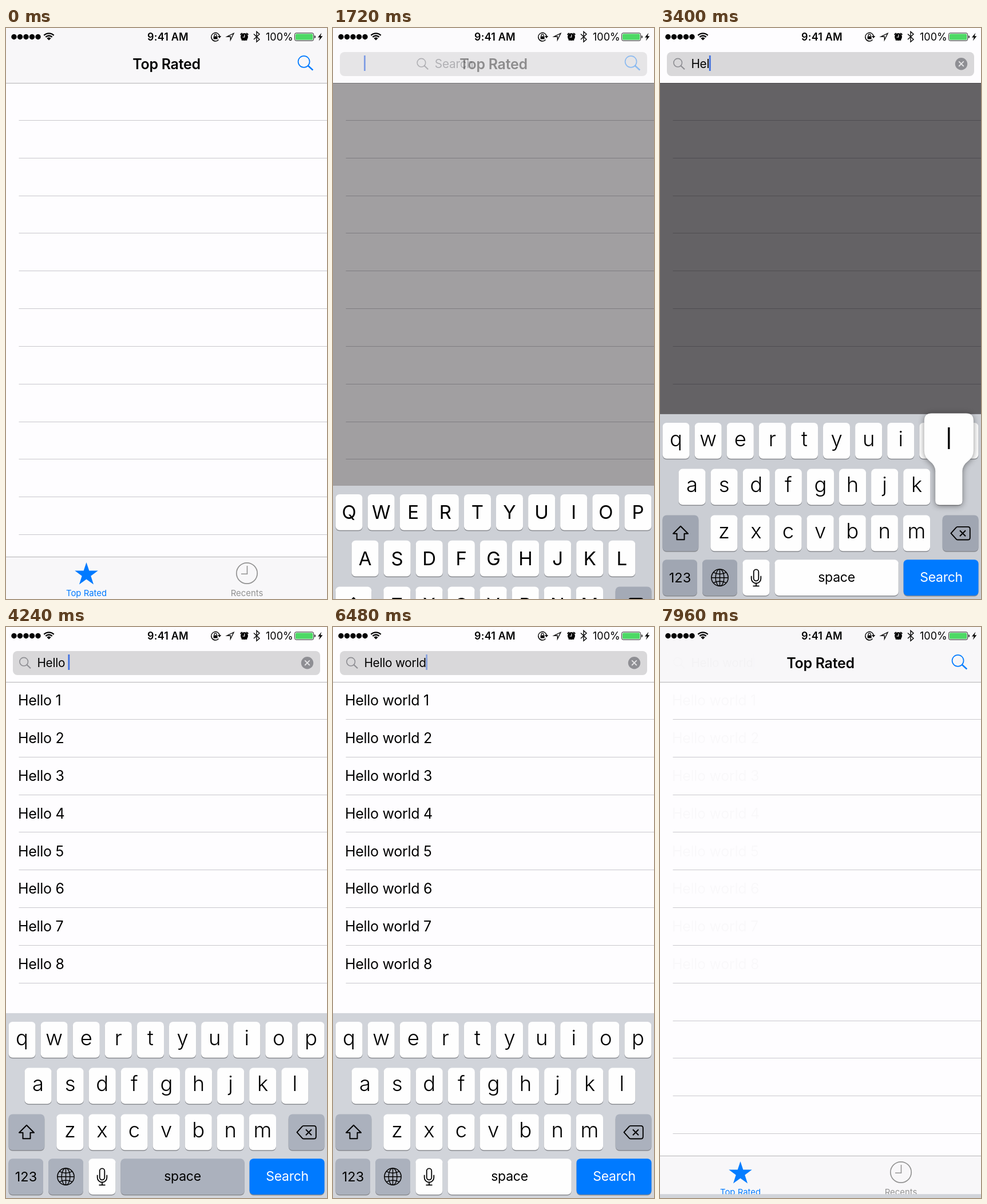
These frames come from a looping animation (561x998 px, 8000 ms). An HTML page with a canvas:

```html
<!DOCTYPE html>
<html lang="en">
<head>
<meta charset="utf-8">
<title>Search</title>
<style>
html, body { margin: 0; width: 100%; height: 100%; overflow: hidden; background: #fefdff; }
canvas { display: block; width: 561px; height: 998px; }
</style>
</head>
<body>
<canvas id="stage" width="561" height="998"></canvas>
<script>
const W = 561, H = 998, LOOP = 8000;
const ctx = document.getElementById('stage').getContext('2d');
const FONT = 'Inter, Roboto, "Liberation Sans", sans-serif';
const BLUE = '#007aff', WHITE = '#fefdff', NAV_H = 96, ROW = 65.82, KB_H = 323.1;

// Timeline in ms
const OPEN = 1602, CLOSE = 7640, SELECT = 7520, DEBOUNCE = 240;
const QUERY = 'Hello world';
const TYPED = [2840, 3180, 3340, 3480, 3620, 4200, 4320, 4420, 4520, 4620, 4720];
const RESULTS = [{ at: TYPED[4] + DEBOUNCE, text: 'Hello' }, { at: TYPED[10] + DEBOUNCE, text: QUERY }];

const clamp = v => Math.max(0, Math.min(1, v));
const lerp = (a, b, p) => a + (b - a) * p;
const mix = (a, b, p) => `rgb(${a.map((v, i) => Math.round(lerp(v, b[i], p)))})`;
const ease = p => 0.5 - 0.5 * Math.cos(Math.PI * clamp(p));
// Remaining distance of a critically damped spring
const spring = (ms, w) => ms <= 0 ? 1 : (1 + w * ms / 1000) * Math.exp(-w * ms / 1000);

function text(s, x, y, size, color, { weight = 400, align = 'left', track = -0.012 } = {}) {
  ctx.font = `${weight} ${size}px ${FONT}`;
  ctx.letterSpacing = `${track * size}px`;
  ctx.textAlign = align;
  ctx.fillStyle = color;
  ctx.fillText(s, x, y);
}

function rect(x, y, w, h, color) {
  ctx.fillStyle = color;
  ctx.fillRect(x, y, w, h);
}

function round(x, y, w, h, r, color) {
  ctx.beginPath();
  ctx.roundRect(x, y, w, h, r);
  ctx.fillStyle = color;
  ctx.fill();
}

function disc(x, y, r, color) {
  ctx.beginPath();
  ctx.arc(x, y, r, 0, 7);
  ctx.fillStyle = color;
  ctx.fill();
}

function stroke(path, color, width) {
  ctx.strokeStyle = color;
  ctx.lineWidth = width;
  ctx.stroke(new Path2D(path));
}

function fill(path, color) {
  ctx.fillStyle = color;
  ctx.fill(new Path2D(path));
}

function ring(x, y, r, color, width) {
  ctx.beginPath();
  ctx.arc(x, y, r, 0, 7);
  ctx.strokeStyle = color;
  ctx.lineWidth = width;
  ctx.stroke();
}

function layer(alpha, draw) {
  if (alpha <= 0.004) return;
  ctx.save();
  ctx.globalAlpha *= alpha;
  draw();
  ctx.restore();
}

function statusBar() {
  for (let i = 0; i < 5; i++) disc(14 + i * 10.5, 15.5, 4.7, '#000');
  for (const r of [12.2, 8]) {
    ctx.beginPath();
    ctx.arc(75, 21.5, r, -Math.PI * 0.75, -Math.PI * 0.25);
    ctx.strokeStyle = '#000';
    ctx.lineWidth = 2.3;
    ctx.stroke();
  }
  fill('M75 21.5 L71.4 17.9 A5 5 0 0 1 78.6 17.9 Z', '#000');
  text('9:41 AM', 283, 21.5, 18, '#000', { weight: 600, align: 'center', track: 0.01 });

  stroke('M371.5 20.5 A7.3 7.3 0 1 1 373.3 15', '#000', 1.4);
  fill('M370 14 h6.2 l-3.1 4 Z M362.6 14.5 h7 v5 h-7 Z', '#000');
  stroke('M364 14.5 v-1.6 a2.1 2.1 0 0 1 4.2 0 v1.6', '#000', 1.3);
  stroke('M398 9.3 L386.2 15 H392.3 V21 Z', '#000', 1.3);
  disc(416.5, 15.6, 6.5, '#000');
  stroke('M409.6 11.8 l3.2 -2.9 M423.4 11.8 l-3.2 -2.9 M412 21.5 l1.5 -1.5 M421 21.5 l-1.5 -1.5', '#000', 1.9);
  stroke('M416.8 11.5 V16 H413.5', WHITE, 1.2);
  stroke('M433 10.6 L443 20 L438 24.2 V6.4 L443 10.8 L433 20', '#000', 1.4);
  text('100%', 454, 21.7, 18, '#000', { track: 0 });
  ctx.beginPath();
  ctx.roundRect(504.6, 8.8, 33, 13.4, 2.5);
  ctx.strokeStyle = '#222';
  ctx.lineWidth = 1;
  ctx.stroke();
  round(506, 10.2, 30.2, 10.6, 1.5, '#4cd964');
  fill('M539 13 q2 .4 2 2.5 q0 2.1 -2 2.5 Z', '#222');
  fill('M551.5 8.5 L545 16.4 H548.7 L546.8 22.5 L553.4 14.2 H549.6 Z', '#000');
}

function separators() {
  for (let i = 0; i < 12; i++) rect(22.5, Math.round(161 + ROW * i), W, 1, '#c8c7cc');
}

function tabBar() {
  rect(0, 924, W, H - 924, '#f8f7f9');
  rect(0, 924, W, 1, '#b2b2b4');
  ctx.beginPath();
  for (let i = 0; i < 10; i++) {
    const r = i % 2 ? 8.2 : 21.3, a = Math.PI * (i / 5 - 0.5);
    ctx.lineTo(140.5 + r * Math.cos(a), 955.2 + r * Math.sin(a));
  }
  ctx.fillStyle = BLUE;
  ctx.fill();
  text('Top Rated', 140.5, 993, 14.9, BLUE, { align: 'center', track: 0 });
  ring(421, 953, 18.2, '#929292', 1.7);
  stroke('M421.5 940 V954.2 H411', '#929292', 1.6);
  text('Recents', 421, 993, 14.9, '#929292', { align: 'center', track: 0 });
}

function resultRows(t) {
  const shown = RESULTS.filter(r => t >= r.at).pop();
  if (!shown) return;
  rect(0, NAV_H + 1, W, H, WHITE);
  separators();
  if (t >= SELECT) rect(0, NAV_H + 1, W, 65, '#d9d8d9');
  for (let i = 0; i < 8; i++) text(`${shown.text} ${i + 1}`, 21, 137.3 + ROW * i, 25, '#000');
}

function caretAlpha(t) {
  const since = t - [OPEN, ...TYPED].filter(k => t >= k).pop() - 630;
  if (since < 0) return 1;
  const v = since % 1020;
  return v < 510 ? clamp(1 - v / 230) : clamp((v - 510) / 230);
}

function searchField(t, query) {
  round(12, 42, 537, 42, 8, '#d9d8da');
  const slide = 208 * (1 - ease((t - OPEN) / 270));
  ctx.save();
  ctx.translate(slide, 0);
  ring(31.2, 60.7, 7.3, '#8e8e93', 1.6);
  stroke('M36.4 66 L43 72.3', '#8e8e93', 2);
  if (!query) text('Search', 54.6, 70, 20.8, '#8e8e93');
  ctx.restore();
  let caretX = 54;
  if (query) {
    text(query, 54.4, 70, 20.8, '#000');
    caretX += ctx.measureText(query).width;
    disc(526.5, 62.7, 10.7, '#8e8e93');
    stroke('M522.2 58.4 l8.6 8.6 m0 -8.6 l-8.6 8.6', '#e4e3e5', 1.8);
  }
  layer(caretAlpha(t), () => rect(caretX, 48, 2.8, 27, '#3f70e2'));
}

function navBar(t, shown, query) {
  rect(0, 0, W, NAV_H, mix([248, 247, 249], [254, 253, 255], shown));
  layer(shown, () => searchField(t, query));
  layer(1 - shown, () => {
    text('Top Rated', 280.5, 71.8, 25, '#000', { weight: 600, align: 'center' });
    const pressed = t >= 1480 && t < CLOSE ? lerp(0.25, 1, clamp((t - 1540) / 100)) : 1;
    layer(pressed, () => {
      ring(520.6, 58.8, 10, BLUE, 1.7);
      stroke('M528 66 L536.3 73.6', BLUE, 2.6);
    });
  });
}

const ROWS = [['qwertyuiop', 4.5], ['asdfghjkl', 32.5], ['zxcvbnm', 88.3]];
const PITCH = 56.1, KEY_W = 47.1, KEY_H = 62.8;
const rowTop = i => [15, 95.7, 176.5, 254.3][i];

function key(x, y, w, color) {
  round(x, y + 1.5, w, KEY_H, 7, '#898b90');
  round(x, y, w, KEY_H, 7, color);
}

function popup(char, top) {
  const r = ROWS.findIndex(([s]) => s.includes(char.toLowerCase()));
  const x = ROWS[r][1] + PITCH * ROWS[r][0].indexOf(char.toLowerCase());
  const y = top + rowTop(r), e = x + KEY_W, o = 19.5;
  ctx.save();
  ctx.shadowColor = 'rgba(0,0,0,.45)';
  ctx.shadowBlur = 11;
  ctx.shadowOffsetY = 1.5;
  fill(`M${x - o + 13} ${y - 97} H${e + o - 13} q13 0 13 13 V${y - 32}
    q0 11 -9 18 q-10.5 8 -10.5 18 V${y + KEY_H - 7} q0 7 -7 7 H${x + 7} q-7 0 -7 -7
    V${y + 4} q0 -10 -10.5 -18 q-9 -7 -9 -18 V${y - 84} q0 -13 13 -13 Z`, '#fefefe');
  ctx.restore();
  text(char, x + KEY_W / 2, y - 35, 52, '#000', { weight: 300, align: 'center', track: 0 });
}

function keyboard(t, top, shade, count) {
  const lower = count > 0, since = t - TYPED[count - 1];
  const pressed = lower && since < 110 ? QUERY[count - 1] : '';
  const fn = mix([171, 177, 189], [160, 166, 178], shade);
  rect(0, top, W, KB_H + 20, mix([209, 212, 218], [203, 206, 212], shade));

  ROWS.forEach(([letters, x0], r) => [...letters].forEach((c, i) => {
    const x = x0 + PITCH * i, y = top + rowTop(r), mid = x + KEY_W / 2;
    key(x, y, KEY_W, '#fefefe');
    if (lower) text(c, mid, y + 40.8, 36.5, '#000', { weight: 300, align: 'center', track: 0 });
    else text(c.toUpperCase(), mid, y + 43.3, 33, '#000', { align: 'center', track: 0 });
  }));

  const y3 = top + rowTop(2), y4 = top + rowTop(3);
  key(4.5, y3, 62.8, lower ? fn : '#fefefe');
  key(493.7, y3, 62.8, fn);
  key(4.5, y4, 60.5, fn);
  key(74, y4, 61, fn);
  key(144.4, y4, KEY_W, '#fefefe');
  key(200.5, y4, 216.2, pressed === ' ' ? fn : '#fefefe');
  key(425.6, y4, 130.9, lower ? BLUE : fn);
  text('123', 35, y4 + 40, 23.5, '#000', { align: 'center', track: 0 });
  text('space', 308.5, y4 + 38.3, 23, '#000', { align: 'center' });
  text('Search', 491.5, y4 + 38.5, 23, lower ? '#fff' : '#7b808a', { align: 'center' });

  ctx.save();
  ctx.lineJoin = 'round';
  ctx.translate(36, y3 + 31.3);
  const arrow = 'M0 -12 L13 1 H6.5 V11.5 H-6.5 V1 H-13 Z';
  if (!lower) fill(arrow, '#000');
  stroke(arrow, '#000', 2);
  ctx.translate(489, 0);
  stroke('M-16.5 .5 L-7.5 -9.5 Q-6.5 -10.8 -5 -10.8 H13 Q16.8 -10.8 16.8 -7 V8 Q16.8 11.8 13 11.8 H-5 Q-6.5 11.8 -7.5 10.5 Z', '#000', 1.9);
  stroke('M-1 -4.5 l10 10 m0 -10 l-10 10', '#000', 2);
  ctx.restore();

  ctx.save();
  ctx.translate(104.5, y4 + 31.5);
  ring(0, 0, 14.6, '#000', 1.5);
  stroke('M0 -14.6 V14.6 M-14.6 0 H14.6 M-11 -9 Q0 -3.5 11 -9 M-11 9 Q0 3.5 11 9', '#000', 1.4);
  ctx.beginPath();
  ctx.ellipse(0, 0, 7.4, 14.6, 0, 0, 7);
  ctx.stroke();
  ctx.translate(63.5, 0);
  ctx.beginPath();
  ctx.roundRect(-4.3, -14.3, 8.6, 20, 4.3);
  ctx.lineWidth = 1.8;
  ctx.stroke();
  stroke('M-8.3 -3 V1.5 A8.3 8.3 0 0 0 8.3 1.5 V-3 M0 9.8 V14.6 M-5.5 14.6 H5.5', '#000', 1.8);
  ctx.restore();

  if (pressed && pressed !== ' ') popup(pressed, top);
}

function draw(t) {
  const left = t < CLOSE ? spring(t - OPEN, 17.4) : 1 - spring(t - CLOSE, 18);
  const open = 1 - left;
  const dim = t < RESULTS[0].at ? open : 0;
  const count = TYPED.filter(k => t >= k).length;

  rect(0, 0, W, H, WHITE);
  separators();
  tabBar();
  rect(0, NAV_H, W, 1, '#b2b2b4');
  rect(0, NAV_H - 1, W, H, `rgba(4,0,4,${0.61 * dim})`);
  layer(open, () => resultRows(t));
  navBar(t, open, QUERY.slice(0, count));
  if (open > 0) keyboard(t, H - KB_H * open, dim, count);
  statusBar();
}

const start = performance.now();
function tick() {
  draw((performance.now() - start) % LOOP);
  requestAnimationFrame(tick);
}
tick();
</script>
</body>
</html>
```
